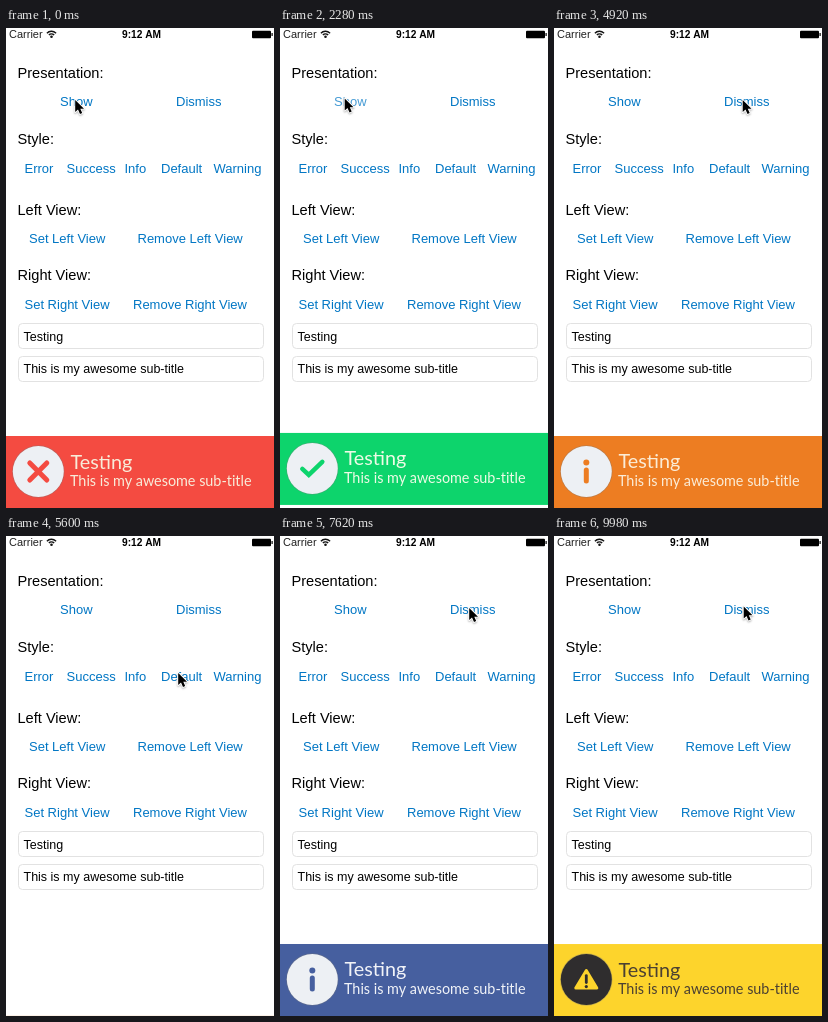
Recreate the animation shown at these times as an HTML page with a canvas. Size 268 px wide and 480 px high, loop 10 s.

```html
<!DOCTYPE html>
<html lang="en">
<head>
<meta charset="utf-8">
<title>Notification banner demo</title>
<style>
  html, body { margin: 0; width: 100%; height: 100%; overflow: hidden; background: #fff; }
  canvas { display: block; width: 268px; height: 480px; }
</style>
</head>
<body>
<canvas id="stage"></canvas>
<script>
const W = 268, H = 480, LOOP = 10000, BANNER_H = 72;
const canvas = document.getElementById('stage');
const ratio = window.devicePixelRatio || 1;
canvas.width = W * ratio;
canvas.height = H * ratio;
const ctx = canvas.getContext('2d');

const SANS = '"Liberation Sans", Arial, sans-serif';
const ROUND = 'Lato, sans-serif';

const headings = [['Presentation:', 50], ['Style:', 116], ['Left View:', 187], ['Right View:', 252]];
const links = [
  ['Show', 54, 78], ['Dismiss', 170, 78],
  ['Error', 18.5, 144.5], ['Success', 60.5, 144.5], ['Info', 118.5, 144.5],
  ['Default', 155, 144.5], ['Warning', 207.5, 144.5],
  ['Set Left View', 23, 215], ['Remove Left View', 131.5, 215],
  ['Set Right View', 18.5, 280.5], ['Remove Right View', 127, 280.5]
];
const fields = [['Testing', 295.5, 312.5], ['This is my awesome sub-title', 328.5, 344.5]];

const light = '#edf0f4';
const banners = [
  { show: -2000, hide: 700, fill: '#f44b41', text: '#f8ecd9', disc: light, icon: cross },
  { show: 2050, hide: 2880, fill: '#0dd46c', text: '#eefbe6', disc: light, icon: check },
  { show: 4045, hide: 5040, fill: '#ed7d22', text: '#fbecd6', disc: light, icon: info },
  { show: 6762, hide: 8120, fill: '#465f9f', text: '#f1f3f8', disc: light, icon: info },
  { show: 9360, hide: 12000, fill: '#fdd42c', text: '#4b4032', disc: '#2f2d2e', icon: warning }
];

// Release times of the button presses
const taps = [
  ['Dismiss', 700], ['Success', 1320], ['Show', 2050],
  ['Dismiss', 2880], ['Info', 3560], ['Show', 4045],
  ['Dismiss', 5040], ['Default', 5800], ['Show', 6762],
  ['Dismiss', 8120], ['Warning', 8960], ['Show', 9360]
];

// Pointer rests: arrival, departure, x, y
const rests = [
  [0, 120, 69, 72], [560, 760, 188, 72], [1180, 1400, 82, 136],
  [1850, 2300, 64.5, 70.5], [2700, 2950, 189, 71], [3400, 3620, 130, 136],
  [3930, 4250, 66, 72], [4720, 5100, 188.5, 72], [5550, 5880, 172, 137],
  [6480, 6900, 72, 75], [7550, 8200, 189, 72], [8620, 8690, 190, 138],
  [8850, 9000, 226, 138], [9260, 9450, 68, 72], [9860, LOOP, 189.5, 70.5]
];

function spring(ms) {
  if (ms <= 0) return 0;
  const t = ms / 1000, damping = 12.25, wave = 12.5;
  return 1 - Math.exp(-damping * t) * (Math.cos(wave * t) + damping / wave * Math.sin(wave * t));
}

function pointerAt(t) {
  let i = rests.length - 1;
  while (rests[i][0] > t) i--;
  const [, leave, x, y] = rests[i];
  if (t <= leave) return [x, y];
  const [arrive, , nx, ny] = rests[i + 1];
  const p = (t - leave) / (arrive - leave), e = p * p * (3 - 2 * p);
  return [x + (nx - x) * e, y + (ny - y) * e];
}

function linkAlpha(name, t) {
  const press = 100, fade = 350;
  let alpha = 1;
  for (const [label, release] of taps) {
    const since = t - release;
    if (label === name && since > -press && since < fade) alpha = 0.2 + 0.8 * Math.max(0, since) / fade;
  }
  return alpha;
}

function text(str, x, y, font, color) {
  ctx.font = font;
  ctx.fillStyle = color;
  ctx.fillText(str, x, y);
}

function disc(x, y, r, color) {
  ctx.fillStyle = color;
  ctx.beginPath();
  ctx.arc(x, y, r, 0, Math.PI * 2);
  ctx.fill();
}

function line(points, color, width, cap = 'butt') {
  ctx.strokeStyle = color;
  ctx.lineWidth = width;
  ctx.lineCap = cap;
  ctx.beginPath();
  points.forEach(([x, y]) => ctx.lineTo(x, y));
  ctx.stroke();
}

// Icons are centred on the origin
function cross(color) {
  line([[-8.5, -8.5], [8.5, 8.5]], color, 5, 'round');
  line([[8.5, -8.5], [-8.5, 8.5]], color, 5, 'round');
}

function check(color) {
  line([[-10, 0.5], [-3.5, 6.5], [10, -6.5]], color, 4.5, 'round');
}

function info(color) {
  disc(0, -9, 3, color);
  line([[0, -1.5], [0, 9.5]], color, 5, 'round');
}

function warning(color) {
  ctx.fillStyle = color;
  ctx.strokeStyle = color;
  ctx.lineWidth = 3;
  ctx.lineJoin = 'round';
  ctx.beginPath();
  ctx.moveTo(0, -9);
  ctx.lineTo(10.5, 8.5);
  ctx.lineTo(-10.5, 8.5);
  ctx.closePath();
  ctx.fill();
  ctx.stroke();
  line([[0, -4], [0, 3]], '#2f2d2e', 2.8, 'round');
  disc(0, 7, 1.6, '#2f2d2e');
}

function drawStatusBar() {
  text('Carrier', 3, 10, '11px ' + SANS, '#222');
  text('9:12 AM', 116, 10, 'bold 10.2px ' + SANS, '#000');
  ctx.strokeStyle = '#111';
  ctx.lineWidth = 1.4;
  ctx.lineCap = 'butt';
  for (const r of [3.6, 6.3]) {
    ctx.beginPath();
    ctx.arc(45.5, 9.5, r, -Math.PI * 0.76, -Math.PI * 0.24);
    ctx.stroke();
  }
  disc(45.5, 8.8, 1.3, '#111');
  ctx.fillStyle = '#000';
  ctx.beginPath();
  ctx.roundRect(246, 2.8, 19, 7.4, 1);
  ctx.fill();
  ctx.fillRect(265.5, 5, 1.2, 3);
}

function drawPage(t) {
  for (const [label, y] of headings) text(label, 11.5, y, '14.6px ' + SANS, '#000');
  for (const [label, x, y] of links) {
    ctx.globalAlpha = linkAlpha(label, t);
    text(label, x, y, '13px ' + SANS, '#0076c4');
  }
  ctx.globalAlpha = 1;
  for (const [label, top, y] of fields) {
    ctx.strokeStyle = '#e2e2e2';
    ctx.lineWidth = 1;
    ctx.beginPath();
    ctx.roundRect(12.5, top, 245, 25, 4);
    ctx.stroke();
    text(label, 17.5, y, '12.5px ' + SANS, '#000');
  }
}

function drawBanner(b, t) {
  const top = H - BANNER_H * (spring(t - b.show) - spring(t - b.hide));
  if (t < b.show || top >= H) return;
  ctx.save();
  ctx.translate(0, top);
  ctx.fillStyle = b.fill;
  ctx.fillRect(0, 0, W, BANNER_H);
  disc(32.3, 35.5, 26.2, 'rgba(120,120,120,0.4)');
  disc(32.3, 35.5, 25.5, b.disc);
  text('Testing', 64.5, 32.5, '19.8px ' + ROUND, b.text);
  ctx.letterSpacing = '-0.01px'; // keeps "ti" from joining
  text('This is my awesome sub-title', 64, 50.2, '14.4px ' + ROUND, b.text);
  ctx.translate(32.3, 35.5);
  b.icon(b.fill);
  ctx.restore();
}

function drawPointer([x, y]) {
  ctx.save();
  ctx.translate(x + 0.2, y);
  ctx.beginPath();
  [[0, 0], [0, 12], [2.8, 9.5], [4.8, 14], [7, 13], [5.1, 8.7], [8.8, 8.7]]
    .forEach(([px, py]) => ctx.lineTo(px, py));
  ctx.closePath();
  ctx.strokeStyle = '#fff';
  ctx.lineWidth = 1.8;
  ctx.lineJoin = 'round';
  ctx.shadowColor = 'rgba(0,0,0,0.3)';
  ctx.shadowBlur = 2 * ratio;
  ctx.shadowOffsetY = ratio;
  ctx.stroke();
  ctx.shadowColor = 'transparent';
  ctx.fillStyle = '#000';
  ctx.fill();
  ctx.restore();
}

function frame() {
  const t = performance.now() % LOOP;
  ctx.setTransform(ratio, 0, 0, ratio, 0, 0);
  ctx.fillStyle = '#fff';
  ctx.fillRect(0, 0, W, H);
  drawStatusBar();
  drawPage(t);
  for (const b of banners) drawBanner(b, t);
  drawPointer(pointerAt(t));
  requestAnimationFrame(frame);
}
frame();
</script>
</body>
</html>
```
